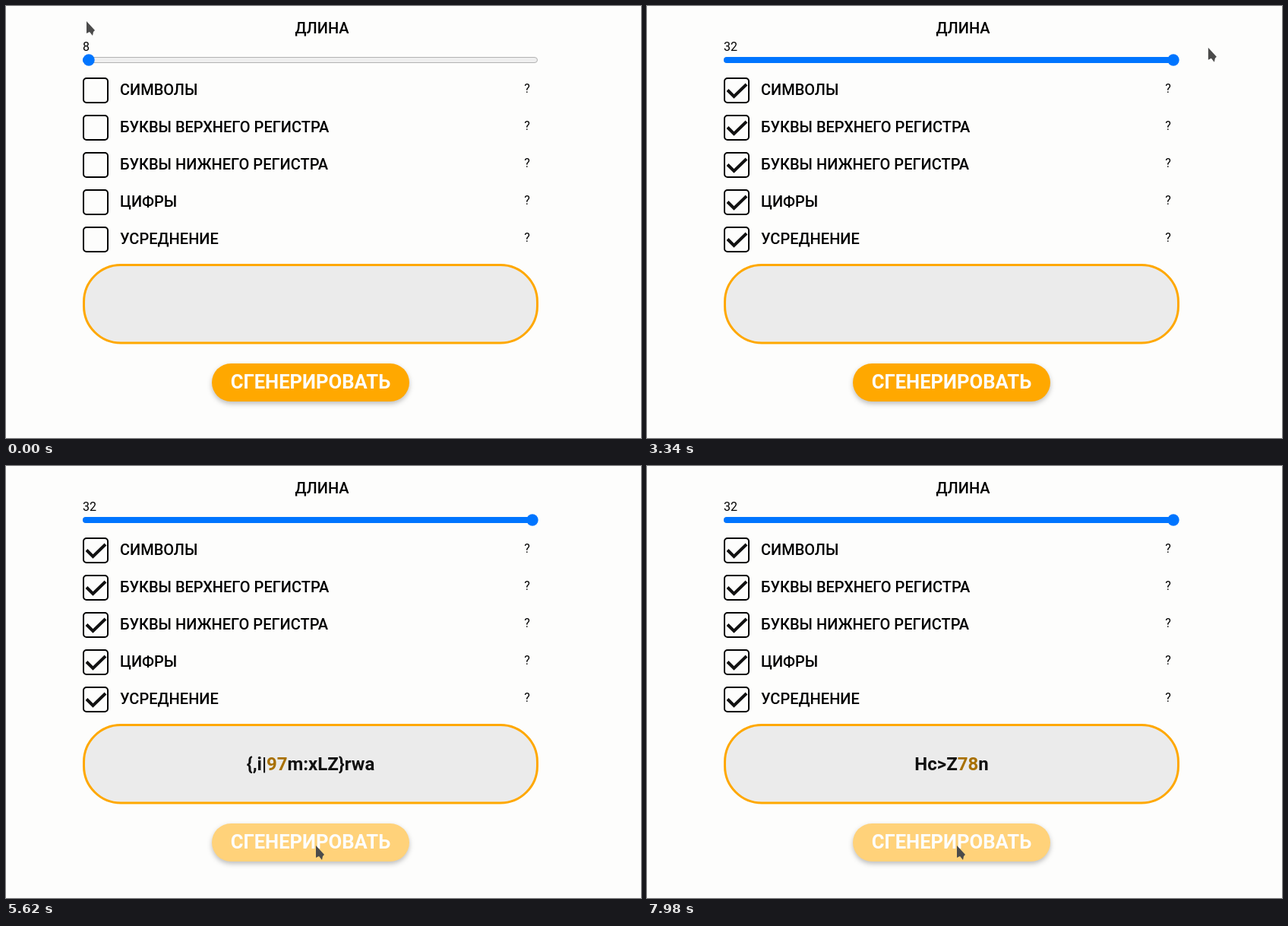
Animation, 836 px wide and 568 px high, one loop 8000 ms. Source, as an HTML page:

```html
<!DOCTYPE html>
<html lang="ru">
<head>
<meta charset="utf-8">
<style>
  html, body { margin: 0; width: 100%; height: 100%; overflow: hidden; background: #fdfdfc; }
  svg { display: block; width: 836px; height: 568px; font: 16px Roboto, sans-serif; }
  .label { font-size: 20px; font-weight: 500; }
  .middle { text-anchor: middle; }
  .box { stroke: #000; stroke-width: 2; }
  .check { fill: none; stroke: #111; stroke-width: 4; }
  #password { font-size: 24px; font-weight: 700; fill: #111; white-space: pre; }
  #password tspan { fill: #a87000; }
  #button { filter: drop-shadow(0 3px 3px rgba(0, 0, 0, .25)); }
  #buttonText { font-size: 25.6px; font-weight: 700; fill: #fdfdfc; }
</style>
</head>
<body>
<svg viewBox="0 0 836 568">
  <text class="label middle" x="416" y="36">ДЛИНА</text>
  <text id="length" x="101" y="59">8</text>
  <rect x="101.5" y="67.5" width="598" height="7" rx="3.5" fill="#efefef" stroke="#b2b2b2"/>
  <rect id="filled" x="101" y="67" height="8" rx="4" fill="#0075ff"/>
  <circle id="thumb" cy="71" r="7.7" fill="#0075ff"/>
  <g id="rows"></g>
  <rect x="102.5" y="340.5" width="597" height="102.5" rx="48.5" fill="#ebebeb" stroke="#ffa800" stroke-width="3"/>
  <text id="password" class="middle" x="401" y="400"></text>
  <rect id="button" x="271" y="470" width="260" height="50" rx="25"/>
  <text id="buttonText" class="middle" x="401" y="503">СГЕНЕРИРОВАТЬ</text>
  <g id="cursor" fill="#4b4b4b">
    <path id="arrow" d="M0 0V16L4 14L8 19L9 14L11 12Z"/>
    <path id="hand" d="M-2 1Q0-2 2 1V7L10 9Q12 10 11 13L9 19H-1L-6 11Q-5 8-2 11Z"/>
  </g>
</svg>
<script>
const LOOP = 8000, CHAR_MS = 76, FADE = 200, STEP = 5;
const PAGE_LAG = 70; // the page reacts slightly after the pointer
const DRAG_START = 2980, DRAG_END = 3280;
const $ = id => document.getElementById(id);
const clamp = v => Math.max(0, Math.min(1, v));
const mix = (a, b, k) => a + (b - a) * k;

const rows = [
  { label: 'СИМВОЛЫ', checked: 920 },
  { label: 'БУКВЫ ВЕРХНЕГО РЕГИСТРА', checked: 1200 },
  { label: 'БУКВЫ НИЖНЕГО РЕГИСТРА', checked: 1520 },
  { label: 'ЦИФРЫ', checked: 1640 },
  { label: 'УСРЕДНЕНИЕ', checked: 1760 }
];
const cursorPath = [
  [0, 106, 20], [400, 110, 446], [820, 112, 108], [960, 112, 112], [1060, 114, 160],
  [1310, 114, 165], [1380, 118, 191], [1480, 114, 210], [1560, 113, 258], [1640, 113, 300],
  [1820, 113, 310], [2100, 112, 108], [2400, 113, 302], [2540, 113, 302], [2640, 113, 262],
  [2720, 111, 121], [2900, 107, 70], [DRAG_START, 109, 70], [DRAG_END, 694, 66],
  [3420, 805, 38], [3980, 470, 418], [4200, 546, 480], [4420, 408, 499]
];
const passwords = [
  { start: 4470, text: '{,i|97m:xLZ}rwY2d)D5t^5lf8&kT4!Gq;6n' },
  { start: 7400, text: 'Hc>Z78nR{4w)' }
];
const scramble = 'kR7%xQ}dWnB4&hT9{uMz2aG;p3';

$('rows').innerHTML = rows.map((row, i) => `
  <g transform="translate(0 ${i * 49})">
    <rect class="box" x="102" y="95" width="32" height="32" rx="4"/>
    <path class="check" d="M106 110.5L114.5 119L131 103"/>
    <text class="label" x="150" y="117">${row.label}</text>
    <circle class="help" cx="686" cy="109" r="15" fill="#ffd27a"/>
    <text class="middle" x="686" y="114">?</text>
  </g>`).join('');

function cursorAt(t) {
  const next = cursorPath.findIndex(point => point[0] > t);
  if (next < 0) return cursorPath.at(-1).slice(1);
  const [t0, x0, y0] = cursorPath[next - 1], [t1, x1, y1] = cursorPath[next];
  const k = (t - t0) / (t1 - t0), eased = k * k * (3 - 2 * k);
  return [mix(x0, x1, eased), mix(y0, y1, eased)];
}

const inside = ([x, y], left, top, width, height) =>
  x > left && x < left + width && y > top && y < top + height;
const overRow = (t, i) => inside(cursorAt(Math.max(0, t)), 101, 94 + i * 49, 34, 34);
const overButton = t => inside(cursorAt(Math.max(0, t)), 271, 470, 260, 50);

// Follows a hover transition through the loop and returns its level by time.
function transition(isOver) {
  const levels = [];
  for (let t = 0, level = 0; t < LOOP; t += STEP) {
    level = clamp(level + (isOver(t - PAGE_LAG) ? STEP : -STEP) / FADE);
    levels.push(level);
  }
  return t => levels[Math.floor(t / STEP)];
}

rows.forEach((row, i) => {
  const group = $('rows').children[i];
  row.parts = ['.box', '.check', '.help'].map(name => group.querySelector(name));
  row.helpLevel = transition(t => overRow(t, i));
});
const buttonLevel = transition(overButton);

function passwordAt(t) {
  const current = passwords.findLast(p => t >= p.start);
  if (!current) return '';
  const count = Math.floor((t - current.start) / CHAR_MS);
  if (count < 1) return '';
  if (count >= current.text.length) return current.text;
  return current.text.slice(0, count - 1) + scramble[Math.floor(t / 20) % scramble.length];
}

function markDigits(text) {
  return text.replace(/&/g, '&amp;').replace(/</g, '&lt;').replace(/>/g, '&gt;')
    .replace(/\d+/g, '<tspan>$&</tspan>');
}

function render(t) {
  const [x, y] = cursorAt(t);

  const dragged = t < DRAG_START ? 0 : t > DRAG_END ? 1 : clamp((x - 109) / 584);
  const steps = Math.round(dragged * 24), thumbX = 109 + 584 * steps / 24;
  $('length').textContent = 8 + steps;
  $('thumb').setAttribute('cx', thumbX);
  $('filled').setAttribute('width', steps === 24 ? 599 : thumbX - 101);

  rows.forEach(({ parts: [box, check, help], checked, helpLevel }, i) => {
    box.setAttribute('fill', overRow(t - PAGE_LAG, i) ? '#ffd27a' : 'none');
    check.style.visibility = t >= checked ? 'visible' : 'hidden';
    help.setAttribute('opacity', helpLevel(t));
  });

  $('password').innerHTML = markDigits(passwordAt(t));
  const lit = buttonLevel(t);
  $('button').setAttribute('fill', `rgb(255, ${mix(168, 210, lit)}, ${mix(0, 122, lit)})`);

  const overBox = rows.some((_, i) => overRow(t, i));
  $('arrow').style.display = overBox ? 'none' : '';
  $('hand').style.display = overBox ? '' : 'none';
  $('cursor').setAttribute('transform', `translate(${x} ${y})`);
}

function tick() {
  render(performance.now() % LOOP);
  requestAnimationFrame(tick);
}
tick();
</script>
</body>
</html>
```
